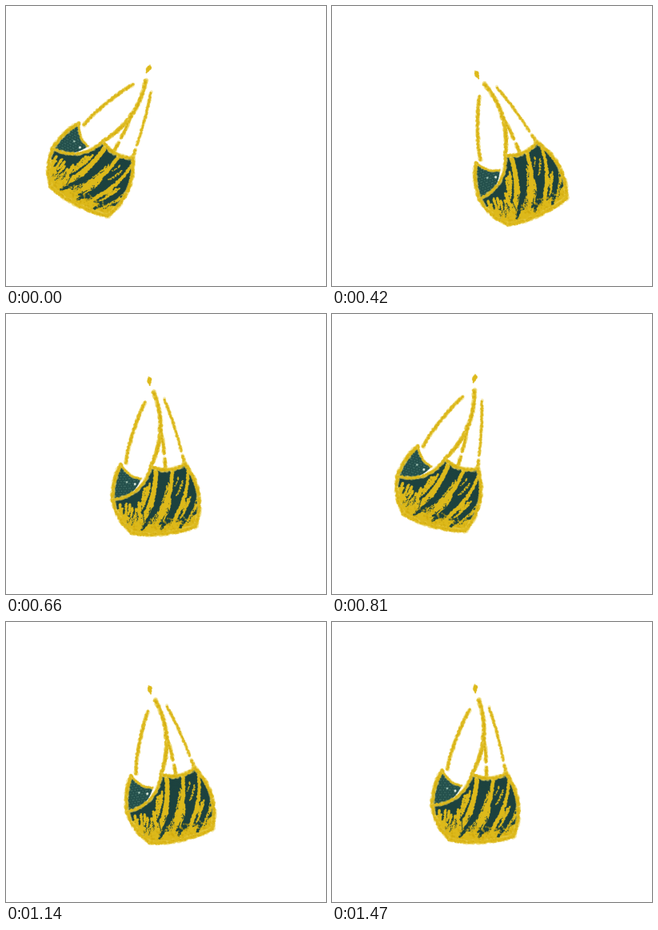
Write an HTML page with a canvas that moves like this. It is 400 by 350 pixels and loops after 2.7 s.

```html
<!DOCTYPE html>
<html lang="en">
<head>
<meta charset="utf-8">
<title>Swinging bag</title>
<style>
html, body { margin: 0; width: 100%; height: 100%; overflow: hidden; background: #fff; }
canvas { display: block; width: 400px; height: 350px; }
</style>
</head>
<body>
<canvas id="stage" width="400" height="350"></canvas>
<script>
const ctx = document.getElementById('stage').getContext('2d');
const W = 400, H = 350, SCALE = 3;
const LOOP = 2700, STEP = 30;
const PIVOT = { x: 187, y: 79 };
const GOLD = '#ddb91b', DEEP = '#d0a80c', PALE = '#ead25a', TEAL = '#1d423f', LINING = '#24504c';

// Times at which the swing turns; each turn is 6 degrees weaker
const TURNS = [0, 480, 815, 1080, 1300, 1470];
const turnAngle = k => (k % 2 ? 6 : -6) * (5 - k);

// Corners of the bag at rest
const TIP = [138, 185], SEAM = [125, 229], LEFT = [147, 272], RIGHT = [227, 268],
  CORNER = [218, 189], FRONT = [175, 190], FOLD = [162, 205];

let seed = 11;
const rand = () => (seed = (seed * 16807) % 2147483647) / 2147483647;
const spread = r => (rand() - 0.5) * 2 * r;
const mix = (a, b, t) => a + (b - a) * t;

// Points on an arc from a to b, about one per pixel; bow is its height
function bend(a, b, bow = 0) {
  const dx = b[0] - a[0], dy = b[1] - a[1], len = Math.hypot(dx, dy);
  const n = Math.ceil(len), pts = [];
  for (let i = 0; i <= n; i++) {
    const t = i / n, lift = bow * 4 * t * (1 - t) / len;
    pts.push([a[0] + dx * t - dy * lift, a[1] + dy * t + dx * lift]);
  }
  return pts;
}

function shape(...arcs) {
  const path = new Path2D();
  arcs.flat().forEach(p => path.lineTo(p[0], p[1]));
  path.closePath();
  return path;
}

function dot(g, x, y, r, color, alpha = 1) {
  g.globalAlpha = alpha;
  g.fillStyle = color;
  g.beginPath();
  g.arc(x, y, r, 0, Math.PI * 2);
  g.fill();
  g.globalAlpha = 1;
}

// Rough wax line: pale halo, uneven core, darker grain
function crayon(g, pts, width) {
  const r = width / 2;
  const layer = (size, jitter, color, alpha, share) => {
    for (const [x, y] of pts)
      if (rand() < share)
        dot(g, x + spread(r * jitter), y + spread(r * jitter), r * size * mix(0.75, 1.15, rand()), color, alpha);
  };
  layer(1.1, 0.5, PALE, 0.45, 1);
  layer(0.8, 0.5, GOLD, 0.8, 0.9);
  layer(0.4, 0.7, DEEP, 0.5, 0.5);
}

// Line that changes width along its way
function slash(g, pts, w0, w1, color) {
  pts.forEach(([x, y], i) => {
    const r = mix(w0, w1, i / pts.length) / 2;
    dot(g, x + spread(0.8), y + spread(0.8), r * mix(0.8, 1.2, rand()), color);
  });
}

// Short strokes in a box, leaning more towards the right of the bag
function flecks(g, count, x, y, w, h, len, width, color) {
  for (let i = 0; i < count; i++) {
    const px = x + rand() * w, py = y + rand() * h, l = len * mix(0.5, 1.3, rand());
    const lean = 0.2 + (px - SEAM[0]) / 300;
    slash(g, bend([px, py], [px - l * lean, py + l], -1), width, width * 0.6, color);
  }
}

const edge = {
  hump: bend(TIP, SEAM, 3),
  left: bend(SEAM, LEFT, 4),
  base: bend(LEFT, RIGHT, 5),
  right: bend(RIGHT, CORNER, 10),
  rim: bend(CORNER, FRONT, -6),
  seam: bend(FRONT, SEAM, -11),
  mouth: bend(FOLD, TIP, -4)
};

function drawBody(g) {
  const body = shape(edge.left, edge.base, edge.right, edge.rim, edge.seam);
  g.save();
  g.clip(body);
  g.fillStyle = TEAL;
  g.fill(body);
  g.fillStyle = GOLD;
  g.fill(shape(bend([120, 232], [240, 246], 24), bend([240, 290], [120, 290])));

  flecks(g, 22, 131, 235, 34, 20, 14, 3, GOLD);
  flecks(g, 22, 176, 222, 22, 26, 15, 2.6, GOLD);
  flecks(g, 14, 214, 222, 16, 24, 14, 2.4, GOLD);

  for (let i = 0; i < 3; i++) {
    const x = 181 + 20 * i;
    slash(g, bend([x, 197], [154 + 20.5 * i, 266], -6), 5 - i, 7 - i, GOLD);
    slash(g, bend([x + 11, 203], [160 + 24 * i, 268], -5), 12 - 2 * i, 3, TEAL);
  }
  flecks(g, 6, 164, 208, 12, 12, 22, 2.6, GOLD);
  flecks(g, 6, 194, 205, 30, 14, 18, 1.8, GOLD);
  flecks(g, 26, 138, 236, 92, 22, 8, 1.4, TEAL);

  for (let i = 0; i < 330; i++)
    dot(g, 125 + rand() * 112, 256 + rand() * 23, 0.6 + rand(), rand() < 0.6 ? DEEP : GOLD, 0.6);
  g.restore();
}

function drawLining(g) {
  const lining = shape(edge.hump, bend(SEAM, FOLD, 7), edge.mouth);
  g.save();
  g.clip(lining);
  g.fillStyle = LINING;
  g.fill(lining);
  for (let i = 0; i < 200; i++)
    dot(g, 124 + 3 * (i % 14) + (i % 4) / 2, 186 + 3 * Math.floor(i / 14), 0.6, '#5f8c80', 0.7);
  g.restore();
  dot(g, 144, 208, 1.2, '#a9cabb');
  dot(g, 154, 211, 1.5, '#dce9df');
}

function drawStraps(g) {
  crayon(g, bend([172, 110], [144, 184], 3), 4.2);
  crayon(g, bend([183, 96], FRONT, -10.5), 4.8);
  crayon(g, bend([190, 150], [192, 176], -1), 4);
  crayon(g, bend([193, 181], [193, 195]), 4.2);
  crayon(g, bend([196, 107], [214, 173], -1.5), 3.6);
  crayon(g, bend([215, 178], CORNER), 3.8);
}

function drawKnot(g) {
  slash(g, bend([179, 78], [179, 84]), 1.5, 5.5, PALE);
  slash(g, bend([179, 82], [180, 88]), 5, 2, GOLD);
}

function drawBag() {
  const layer = document.createElement('canvas');
  layer.width = W * SCALE;
  layer.height = H * SCALE;
  const g = layer.getContext('2d');
  g.scale(SCALE, SCALE);
  drawBody(g);
  drawLining(g);
  drawStraps(g);
  for (const name of ['hump', 'left', 'base', 'right', 'rim']) crayon(g, edge[name], 4.6);
  crayon(g, edge.seam, 4);
  crayon(g, edge.mouth, 3.2);
  drawKnot(g);
  return layer;
}

function angleAt(t) {
  const k = TURNS.findIndex(end => t < end);
  if (k < 0) return 0;
  const u = Math.pow((t - TURNS[k - 1]) / (TURNS[k] - TURNS[k - 1]), 1.12);
  return mix(turnAngle(k - 1), turnAngle(k), (1 - Math.cos(Math.PI * u)) / 2);
}

const bag = drawBag();
ctx.imageSmoothingQuality = 'high';
let start;

function frame(now) {
  if (start === undefined) start = now;
  const t = Math.floor(((now - start) % LOOP) / STEP) * STEP;
  ctx.fillStyle = '#fff';
  ctx.fillRect(0, 0, W, H);
  ctx.save();
  ctx.translate(PIVOT.x, PIVOT.y);
  ctx.rotate(-angleAt(t) * Math.PI / 180);
  ctx.drawImage(bag, -PIVOT.x, -PIVOT.y, W, H);
  ctx.restore();
  requestAnimationFrame(frame);
}
requestAnimationFrame(frame);
</script>
</body>
</html>
```
